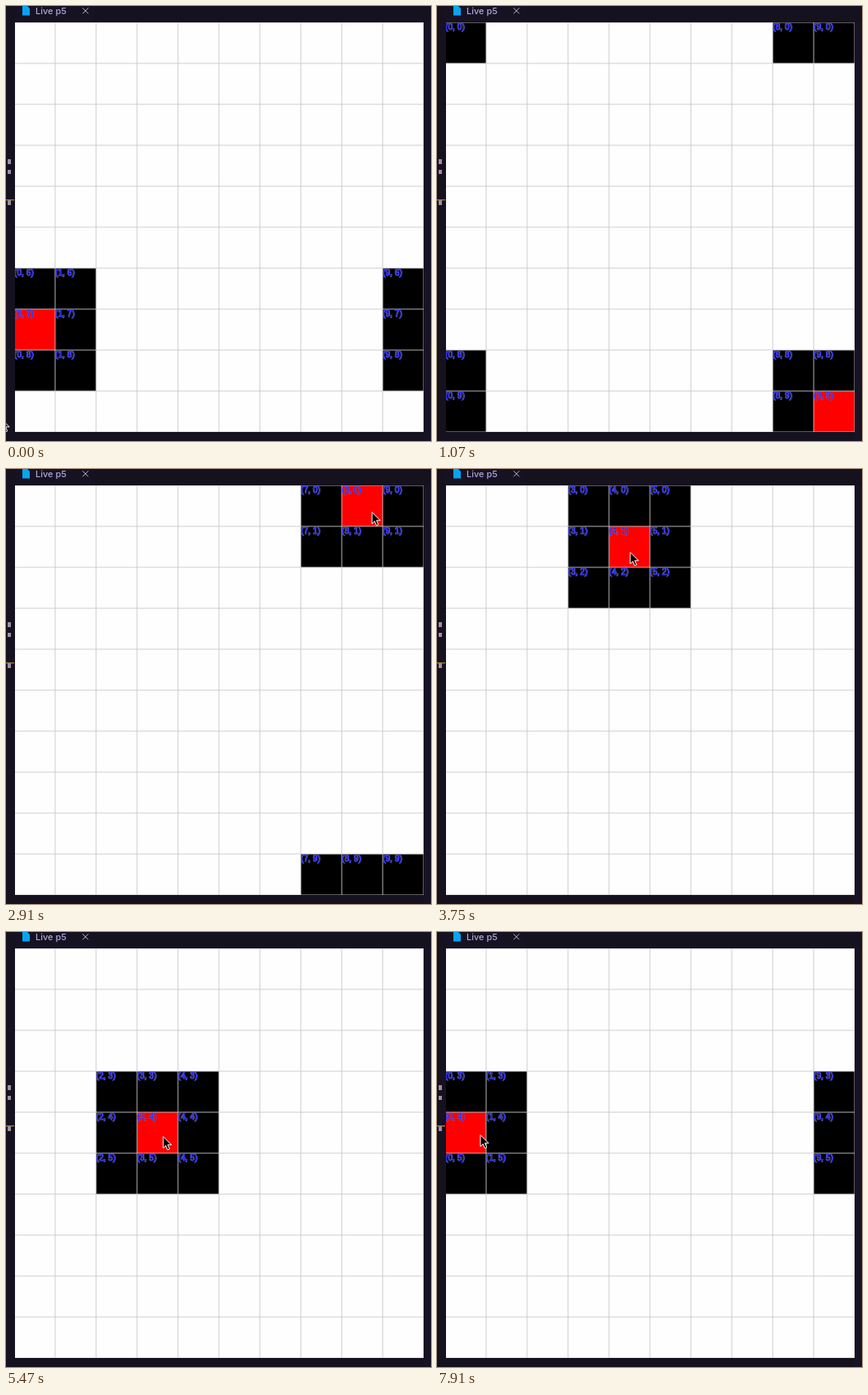
Write an HTML page that moves like this. It is 519x531 px and loops after 8 s.

```html
<!DOCTYPE html>
<html lang="en">
<head>
<meta charset="utf-8">
<title>Grid neighbours</title>
<style>
  html, body { margin: 0; width: 100%; height: 100%; overflow: hidden; background: #16111f; }
  svg { display: block; width: 519px; height: 531px; }
  .tab { font: 500 11px Inter, Roboto, sans-serif; fill: #aea6dc; }
  .label {
    font: 10.2px "Liberation Sans", Arial, sans-serif;
    fill: #1e1eff; stroke: #6868cc; stroke-width: 1; paint-order: stroke;
  }
  .grid { stroke: #c8c8c8; stroke-opacity: .9; fill: none; }
</style>
</head>
<body>
<svg viewBox="0 0 519 531">
  <defs><clipPath id="view"><rect x="11" y="20" width="499" height="500"/></clipPath></defs>
  <rect width="519" height="531" fill="#16111f"/>
  <rect x="11" width="98" height="20" fill="#171221"/>
  <rect x="510" y="20" width="9" height="511" fill="#181324"/>

  <path d="M20 -.5h5.5l3.5 3.5V11.5h-9z" fill="#05a5f5"/>
  <text class="tab" x="36" y="9.7">Live p5</text>
  <path d="M93.5 2.3l7 7m0-7l-7 7" stroke="#b9b3cf" fill="none"/>

  <g fill="#9c8fa6">
    <rect x="2" y="187" width="4" height="6"/>
    <rect x="2" y="200" width="4" height="5"/>
    <rect x="2" y="237" width="4" height="6"/>
  </g>
  <rect y="236" width="10" height="1.4" fill="#9a7c34"/>

  <g clip-path="url(#view)">
    <rect x="10" y="20" width="500" height="500" fill="#fefefe"/>
    <g id="cells"></g>
    <path id="lines" class="grid"/>
    <g id="labels"></g>
  </g>
  <path id="cursor" d="M0 1.7V15.7L3.2 12.7 5.3 17.9 7.7 16.9 5.5 11.8H10.1Z" fill="#000" stroke="#fff"/>
</svg>
<script>
const LOOP = 8000, STEP = 60, LAG = .45;
const SIZE = 50, COUNT = 10, LEFT = 10, TOP = 20;
const $ = id => document.getElementById(id);

function make(parent, tag, attrs) {
  const el = document.createElementNS("http://www.w3.org/2000/svg", tag);
  for (const key in attrs) el.setAttribute(key, attrs[key]);
  return parent.appendChild(el);
}

const mix = (a, b, k) => a + (b - a) * k;
const easeOut = k => 1 - (1 - k) ** 2;
const wrap = n => (n + COUNT) % COUNT;
const cellAt = (pos, origin) =>
  Math.max(0, Math.min(COUNT - 1, Math.floor((pos - origin) / SIZE)));

// The pointer eases to each point in short steps; the cell follows slightly behind it
const poses = [];
let last = { x: -6, y: 290 };
function glide(start, steps, x, y = last.y) {
  const from = last;
  for (let i = 1; i <= steps; i++) {
    const k = easeOut(i / steps);
    const px = mix(from.x, x, k), py = mix(from.y, y, k);
    const pose = {
      time: start + (i - 1) * STEP, x: px, y: py,
      col: cellAt(mix(px, last.x, LAG), LEFT),
      row: cellAt(mix(py, last.y, LAG), TOP)
    };
    poses.push(pose);
    last = pose;
  }
}

// Along the bottom edge and out at the corner
glide(0, 1, -6, 502);
glide(110, 3, 30, 514);
glide(590, 3, 230);
glide(890, 4, 540, 500);
// Back in and up the right side
glide(1670, 1, 525, 440);
glide(2030, 3, 485, 158);
glide(2320, 5, 485, 140);
glide(2790, 4, 444, 45);
// Left and down to the middle
glide(3270, 4, 340, 19);
glide(3630, 7, 185, 140);
glide(4280, 3, 216, 240);
// Slowly left to the edge
glide(5300, 4, 190, 248);
glide(5890, 6, 158);
glide(6610, 6, 76);
glide(7620, 6, 52, 246);

let lines = "";
for (let i = 0; i <= COUNT; i++) {
  lines += `M${LEFT + i * SIZE} ${TOP}v500M${LEFT} ${TOP + i * SIZE}h500`;
}
$("lines").setAttribute("d", lines);

const block = [];
for (let dy = -1; dy <= 1; dy++) {
  for (let dx = -1; dx <= 1; dx++) {
    const fill = dx || dy ? "#000" : "#f00";
    block.push({
      dx, dy,
      rect: make($("cells"), "rect", { width: SIZE, height: SIZE, fill }),
      label: make($("labels"), "text", { class: "label" })
    });
  }
}

function show(pose) {
  $("cursor").setAttribute("transform", `translate(${Math.round(pose.x)} ${Math.round(pose.y)})`);
  for (const { dx, dy, rect, label } of block) {
    const col = wrap(pose.col + dx), row = wrap(pose.row + dy);
    const x = LEFT + col * SIZE, y = TOP + row * SIZE;
    rect.setAttribute("x", x);
    rect.setAttribute("y", y);
    label.setAttribute("x", x);
    label.setAttribute("y", y + 9);
    label.textContent = `(${col}, ${row})`;
  }
}

let shown;
function draw() {
  const time = performance.now() % LOOP;
  const pose = poses.filter(p => p.time <= time).pop();
  if (pose !== shown) show(shown = pose);
  requestAnimationFrame(draw);
}
draw();
</script>
</body>
</html>
```
